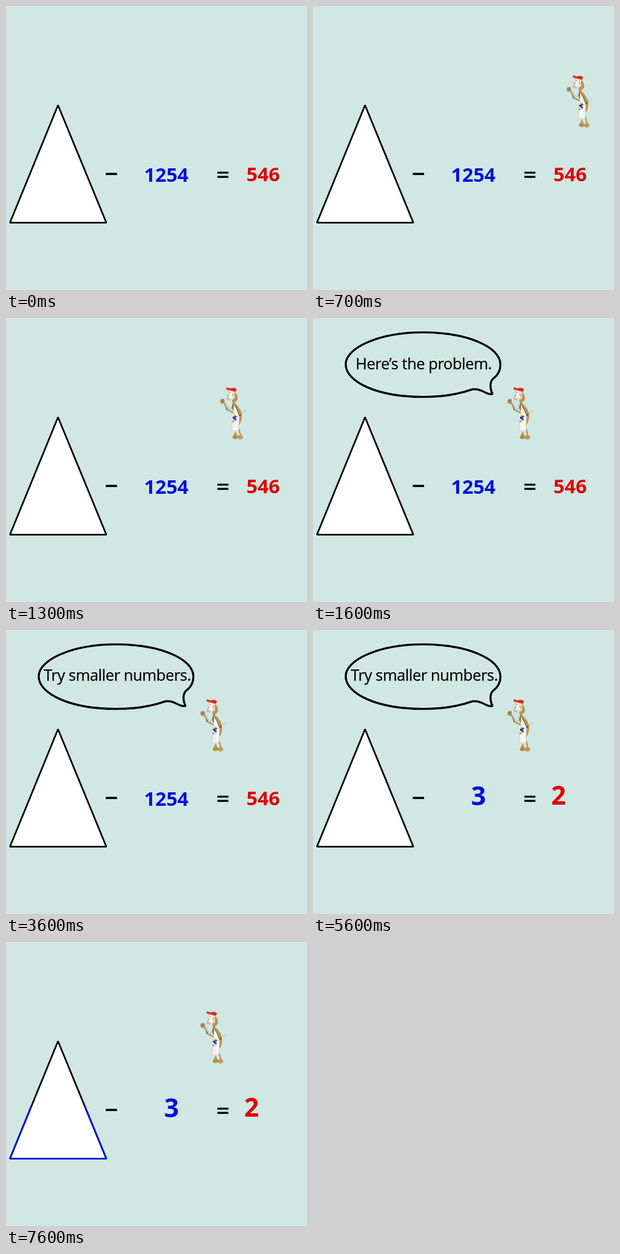
An HTML page for the animation above (8 s loop, 534 by 504 pixels).

```html
<!DOCTYPE html>
<html lang="en">
<head>
<meta charset="utf-8">
<title>Subtraction with a triangle</title>
<style>
  html, body { margin: 0; width: 100%; height: 100%; overflow: hidden; background: #d1e7e3; }
  svg { display: block; }
  text { font-family: "Open Sans", "Noto Sans", sans-serif; }
  .big { font-weight: 700; font-size: 34.5px; }
  .small { font-weight: 700; font-size: 46px; }
  .say { font-size: 27.5px; letter-spacing: -.5px; stroke: #000; stroke-width: .25px; }
  .blue { fill: #0010d8; }
  .red { fill: #e00000; }
  .line { fill: none; stroke: #000; stroke-width: 3; stroke-linejoin: bevel; }
</style>
</head>
<body>
<svg width="534" height="504" viewBox="0 0 534 504">
  <path class="line" style="fill:#fff" d="M92.3 176L178 384.500H7Z"/>
  <path id="base" class="line" style="stroke:#0010dc" d="M44.600 292L7 384.500H178L139.900 292"/>
  <path d="M177 296h20v4h-20zM375 294h19.500v3.500h-19.500zM375 301.500h19.500v3.500h-19.500z"/>

  <g id="large" class="big">
    <text class="blue" x="245" y="312">1254</text>
    <text class="red" x="426.500" y="311">546</text>
  </g>
  <g id="little" class="small">
    <text class="blue" x="280.500" y="310.500">3</text>
    <text class="red" x="422.500" y="310">2</text>
  </g>

  <g id="bubble">
    <path class="line" style="stroke-width:3.6" d="M195 25.500C271 25.500 332.500 50 332.500 83C332.500 93 328 101 321 106.500C314 111 313 123 318.500 135C306 137 302 125 283 126.500C262 134 235 140 195 140C115 140 58 114 58 82C58 53 117 25.500 195 25.500Z"/>
    <text id="intro" class="say" x="75.500" y="91">Here’s the problem.</text>
    <text id="hint" class="say" x="67" y="90">Try smaller numbers.</text>
  </g>

  <g id="monkey" stroke-linecap="round" stroke-linejoin="round">
    <!-- tail -->
    <path d="M37 47Q41 47 40.500 43Q42 39 45 41Q46.500 44 43 46" fill="none" stroke="#b9c8c6" stroke-width="1"/>
    <!-- back and legs -->
    <path d="M24 29Q36 40 36 50Q36 59 32 65" fill="none" stroke="#bd9350" stroke-width="5"/>
    <path d="M33 73L36 85" fill="none" stroke="#a98850" stroke-width="2"/>
    <path d="M27 78L23 87H31Z" fill="#bd9350"/>
    <ellipse cx="26.500" cy="88.500" rx="4.700" ry="3.300" fill="#b58b48"/>
    <ellipse cx="35.500" cy="88.500" rx="5" ry="4" fill="#c39a58"/>
    <!-- head -->
    <path d="M25 8Q32 12 31 21Q28 28 23 27Q19 25 22 22L26 19Z" fill="#bd9350"/>
    <path d="M15 6L25 7Q27 17 21 20Q16 25 12 22Q10 20 14 16Q13 10 15 6Z" fill="#f5f1e7" stroke="#ad986f" stroke-width=".6"/>
    <path d="M16 9L18 10M22 11L23 15M12 20L17 21M15 13L13 17" stroke="#66513a" stroke-width=".9"/>
    <path d="M11 0Q15 1 18 2Q24 0 28.500 2.500Q30 6 26 8Q21 6 17 5L11 4Z" fill="#dc291b"/>
    <!-- apron -->
    <path d="M22 30L25 30Q31 40 34 50L33 77H21L22 45Z" fill="#f4f3ef"/>
    <path d="M25 31Q30 38 33 48L36 50M33 51L37 48" fill="none" stroke="#302a23" stroke-width="1"/>
    <path d="M21 58V77H33L33 60" fill="none" stroke="#c7c8c2" stroke-width=".7"/>
    <!-- arm and hand -->
    <path d="M23 28L23 41M6 26L10 34L13 40L23 45" fill="none" stroke="#a58450" stroke-width="2"/>
    <path d="M9 26L14 36L18 40L22 30" fill="none" stroke="#c6c8b9" stroke-width="1.500"/>
    <path d="M23 30L21 38M11 36V40" stroke="#4c3c25" stroke-width="1"/>
    <ellipse cx="3.700" cy="25" rx="3.700" ry="4.300" fill="#b08b4b"/>
    <path d="M3 23L5 26M6 21L7 24" stroke="#745a30" stroke-width=".9"/>
    <!-- paint -->
    <circle cx="24.500" cy="49" r="2" fill="#f0d22d"/>
    <circle cx="24.500" cy="54" r="2.500" fill="#263e9f"/>
    <circle cx="27.500" cy="52" r="2" fill="#3452b5"/>
    <circle cx="27" cy="57" r="2" fill="#2e4ea8"/>
    <circle cx="23" cy="60.500" r="1.800" fill="#dd7d24"/>
  </g>
</svg>
<script>
  const LOOP = 8000;
  const walk = [[0, 560], [500, 515], [700, 450], [1000, 415], [1300, 380], [1600, 345]];
  const shown = {
    base: [7600, LOOP],
    large: [0, 5600],
    little: [5600, LOOP],
    bubble: [1600, 7600],
    intro: [1600, 3600],
    hint: [3600, 7600]
  };
  const get = id => document.getElementById(id);
  const start = performance.now();

  function draw(now) {
    const t = Math.max(0, now - start) % LOOP;
    const x = walk.filter(step => step[0] <= t).pop()[1];
    get("monkey").setAttribute("transform", `translate(${x} 123)`);
    for (const [id, [from, to]] of Object.entries(shown))
      get(id).style.display = t >= from && t < to ? "" : "none";
    requestAnimationFrame(draw);
  }
  draw(start);
</script>
</body>
</html>
```
